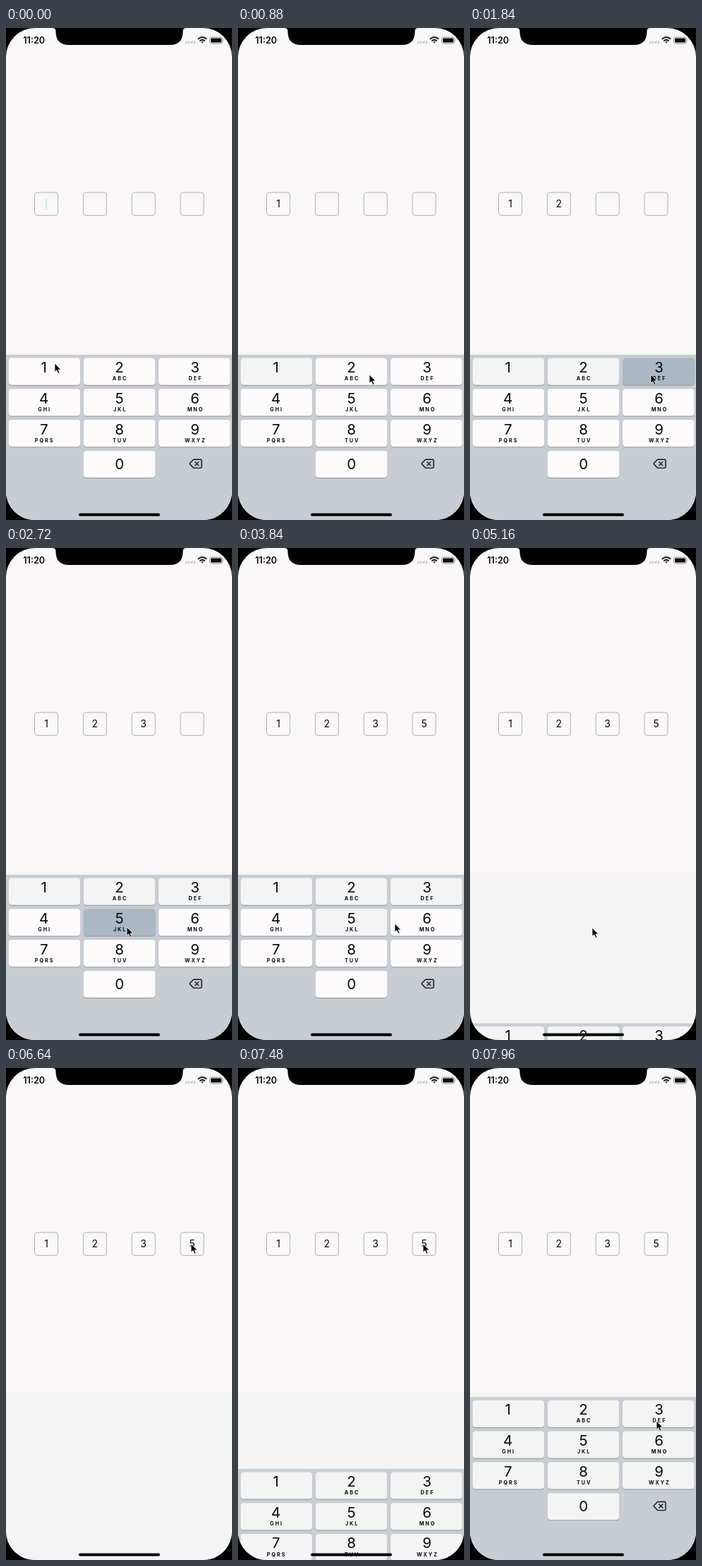
An HTML page that plays this animation: 320x697 px, repeating every 8 s.

```html
<!DOCTYPE html>
<html lang="en">
<head>
<meta charset="utf-8">
<title>Passcode entry</title>
<style>
  html, body { margin: 0; width: 100%; height: 100%; overflow: hidden; background: #000; }
  svg { display: block; width: 100%; height: 100%; font-family: Inter, Roboto, sans-serif; }
  text { text-anchor: middle; fill: #080808; }
  .number { font-size: 20.5px; }
  .letters { font-size: 7.2px; font-weight: 700; letter-spacing: 2px; }
  .digit { font-size: 14px; }
  .clock { font-size: 12.6px; font-weight: 600; }
</style>
</head>
<body>
<svg id="stage" viewBox="0 0 320 697">
  <clipPath id="screen"><rect width="320" height="697" rx="41"/></clipPath>
  <g clip-path="url(#screen)">
    <rect width="320" height="697" fill="#f9f7f8"/>
    <rect y="460" width="320" height="237" fill="#f4f4f4"/>
    <g id="boxes"></g>
    <g id="keyboard">
      <rect y="463" width="320" height="240" fill="#c8ccd3"/>
      <g id="keys"></g>
      <g fill="none" stroke="#111" stroke-width="1.4" stroke-linecap="round" stroke-linejoin="round">
        <path d="M260 617.3L265 611.8Q265.6 611.2 266.5 611.2H275Q277 611.2 277 613.2V621.4Q277 623.4 275 623.4H266.5Q265.6 623.4 265 622.8Z"/>
        <path d="M267.8 614.8l5 5m0-5l-5 5"/>
      </g>
    </g>
    <path d="M66 0Q70.5 0 70.5 5Q70.5 24 89 24H232Q250.5 24 250.5 5Q250.5 0 255 0Z"/>
    <text class="clock" x="39.7" y="22">11:20</text>
    <path d="M255.3 20.3H268" stroke="#b9b8ba" stroke-width="2.8" stroke-linecap="round" stroke-dasharray="0 3.9"/>
    <g fill="none" stroke="#080808" stroke-width="1.9">
      <path d="M272 15.8Q278 10.4 284 15.8M274.3 18.3Q278 15 281.7 18.3"/>
      <path d="M276.2 19.6Q278 18.2 279.8 19.6L278 21.6Z" fill="#080808" stroke="none"/>
    </g>
    <rect x="288.5" y="13" width="18" height="9" rx="2.6" fill="none" stroke="#8b8b8d"/>
    <rect x="290" y="14.5" width="15" height="6" rx="1.3" fill="#080808"/>
    <path d="M307.7 16Q309.4 17.5 307.7 19Z" fill="#8b8b8d"/>
    <rect x="103" y="687.6" width="115" height="4" rx="2"/>
  </g>
  <path id="cursor" d="M0 0V12.2L2.8 9.7L4.9 14.4L7 13.4L5 9H8.8Z" fill="#050505" stroke="#fff" stroke-width=".8"/>
</svg>
<script>
const LOOP = 8000;
const KEYBOARD_DROP = 234, HIDE_AT = 4740, SHOW_AT = 7280;
const PRESS_HOLD = 100, TYPE_DELAY = 80;
const CARET_HOLD = 120, CARET_FADE = 240;
const $ = id => document.getElementById(id);

function add(parent, tag, attrs, text = '') {
  const el = document.createElementNS('http://www.w3.org/2000/svg', tag);
  for (const name in attrs) el.setAttribute(name, attrs[name]);
  el.textContent = text;
  parent.appendChild(el);
  return el;
}

const presses = [
  { key: 1, at: 440 }, { key: 2, at: 1200 }, { key: 3, at: 1840 }, { key: 5, at: 2720 }, { key: 5, at: 4520 }
];

// Each typed digit hands the caret to the next box
let focus = -TYPE_DELAY;
const boxes = presses.slice(0, 4).map(({ key, at }, i) => {
  const x = 40.5 + i * 68.85, mid = x + 16.5;
  add($('boxes'), 'rect', { x, y: 233, width: 33, height: 32.5, rx: 4, fill: 'none', stroke: '#b0aeb0' });
  const box = { focus, typed: at + TYPE_DELAY };
  box.label = add($('boxes'), 'text', { class: 'digit', x: mid, y: 254 }, key);
  box.caret = add($('boxes'), 'rect', { x: mid - .6, y: 241, width: 1.2, height: 16.5, fill: '#98edd4' });
  focus = box.typed;
  return box;
});

const letters = ['', 'ABC', 'DEF', 'GHI', 'JKL', 'MNO', 'PQRS', 'TUV', 'WXYZ', ''];
const keys = letters.map((label, i) => {
  const number = (i + 1) % 10;
  const column = number ? i % 3 : 1, row = Math.floor(i / 3);
  const x = 3.6 + column * 106.2, y = 467.5 + row * 43.8, mid = 53.7 + column * 106.9;
  const size = { x, width: 101.6, height: 38.2, rx: 4.2 };
  add($('keys'), 'rect', { ...size, y: y + 1, fill: '#92959b' });
  const face = add($('keys'), 'rect', { ...size, y });
  add($('keys'), 'text', { class: 'number', x: mid, y: y + (number ? 20.4 : 25.6) }, number);
  add($('keys'), 'text', { class: 'letters', x: mid + 1, y: y + 31.6 }, label);
  return { number, face };
});

// Eased pointer moves; sag bows the path downwards, sway bends it into an S
const home = { x: 69, y: 475 };
const moves = [
  { from: 580, to: 860, x: 186, y: 491 },
  { from: 1340, to: 1620, x: 256, y: 491 },
  { from: 2060, to: 2550, x: 171, y: 537 },
  { from: 3040, to: 3840, x: 222, y: 532, sag: 14 },
  { from: 3840, to: 4200, x: 173, y: 538, sag: 12 },
  { from: 5160, to: 6200, x: 262, y: 249, sway: -19 },
  { from: 7600, to: 7960, x: 264, y: 500 }
];

const clamp = u => Math.min(1, Math.max(0, u));

function pointer(t) {
  let { x, y } = home;
  for (const { from, to, sag = 0, sway = 0, ...end } of moves) {
    const u = clamp((t - from) / (to - from)), ease = u * u * (3 - 2 * u);
    x += (end.x - x) * ease + sway * Math.sin(2 * Math.PI * ease);
    y += (end.y - y) * ease + sag * Math.sin(Math.PI * ease);
  }
  return `${x} ${y}`;
}

// Critically damped spring from 0 to 1
function spring(ms) {
  const x = Math.max(0, ms) * .0092;
  return 1 - (1 + x) * Math.exp(-x);
}

function keyColor(number, t) {
  const begun = presses.filter(p => p.key === number && t >= p.at);
  if (begun.some(p => t < p.at + PRESS_HOLD)) return '#aab8c3';
  return begun.length || t >= HIDE_AT ? '#f4f4f5' : '#fcfafb';
}

function caretOpacity({ focus, typed }, t) {
  if (t < focus || t >= typed) return 0;
  return 1 - clamp((t - focus - CARET_HOLD) / CARET_FADE);
}

function draw(t) {
  for (const box of boxes) {
    box.label.setAttribute('opacity', t >= box.typed ? 1 : 0);
    box.caret.setAttribute('opacity', caretOpacity(box, t));
  }
  for (const key of keys) key.face.setAttribute('fill', keyColor(key.number, t));
  const hidden = spring(t - HIDE_AT) - spring(t - SHOW_AT);
  $('keyboard').setAttribute('transform', `translate(0 ${hidden * KEYBOARD_DROP})`);
  $('cursor').setAttribute('transform', `translate(${pointer(t)})`);
}

const start = performance.now();
function tick() {
  draw((performance.now() - start) % LOOP);
  requestAnimationFrame(tick);
}
tick();
</script>
</body>
</html>
```
